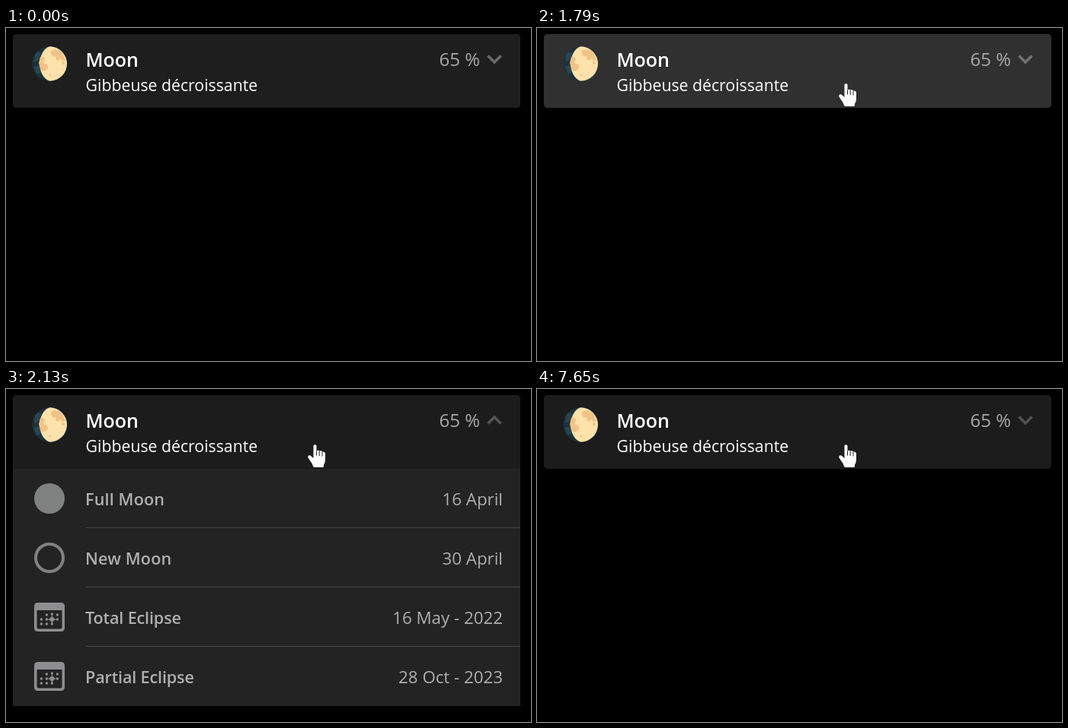
An HTML page that plays this animation: 689x438 px, repeating every 8000 ms.

```html
<!DOCTYPE html>
<html lang="en">
<head>
<meta charset="utf-8">
<title>Moon card</title>
<style>
html, body { margin: 0; width: 100%; height: 100%; overflow: hidden; background: #000; }
svg { display: block; width: 689px; height: 438px; }
text { font-family: "Open Sans", "Noto Sans", sans-serif; white-space: pre; }
.title { font-size: 25px; font-weight: 600; fill: #fff; }
.phase { font-size: 21.25px; fill: #fff; }
.percent { font-size: 24px; fill: #a9a9ab; text-anchor: end; }
.label { font-size: 21.6px; font-weight: 600; fill: #afafaf; }
.date { font-size: 22.3px; fill: #afafaf; text-anchor: end; }
.rule { stroke: #464646; }
#chevron { fill: none; stroke-width: 3.7; }
</style>
</head>
<body>
<svg viewBox="0 0 689 438">
  <defs>
    <clipPath id="reveal"><rect id="window" x="9" y="105" width="666" height="0"/></clipPath>
    <clipPath id="disc"><circle cx="57.2" cy="47" r="22.8"/></clipPath>
    <g id="calendar" fill="#8e8e91">
      <path fill-rule="evenodd" d="M42-20H72Q77-20 77-15V13Q77 18 72 18H42Q37 18 37 13V-15Q37-20 42-20ZM40.5-10V12.5Q40.5 14.5 42.5 14.5H71.500Q73.500 14.5 73.500 12.5V-10Z"/>
      <g id="dots"></g>
      <circle cx="60.4" cy="2" r="3.1"/>
      <path d="M60.400-3V7M55.400 2H65.400" stroke="#8e8e91" stroke-width="1.3"/>
    </g>
  </defs>

  <g id="rows" clip-path="url(#reveal)">
    <rect x="9" y="105" width="666" height="312" fill="#232323"/>
  </g>

  <path id="header"/>
  <g clip-path="url(#disc)">
    <rect x="34" y="24" width="47" height="46" fill="#1d303b"/>
    <path d="M38 33q5-3 8 0l-3 9-6 3zM36 51l7-2 4 9-6 3z" fill="#294552"/>
    <path d="M57.500 24C40 30 40 64 57.500 70H82V24Z" fill="#fee2ac"/>
    <g fill="#f1c386">
      <path d="M59 30q4-3 8-1 5 0 8 6l3 7-4 1-3-3-2 3-4-2 1-3-5-1-2-3z"/>
      <path d="M45 38q5-1 6 3l-2 5 5 2q3 4-1 7l-4 2-4-3-2-8z"/>
      <circle cx="75" cy="46" r="2"/>
      <circle cx="58" cy="62" r="1.500"/>
    </g>
  </g>
  <text class="title" x="104.500" y="51">Moon</text>
  <text class="phase" x="104.600" y="83">Gibbeuse décroissante</text>
  <text class="percent" x="622" y="50">65 %</text>
  <path id="chevron"/>

  <g id="cursor">
    <path id="arrow" d="M0 0V25L5.700 19.600 9.500 28.500 13.500 26.800 9.800 18.200H17.500Z" fill="#fff"/>
    <g id="hand">
      <path d="M-2 1.500Q0-1.500 2 1.500V8.500Q4.300 6.800 5.700 8.800 8.200 7.500 9.500 9.800 12.500 9 13.500 11.500V20Q13.500 24 11.500 26.500V28.500Q11.500 30 10 30H-.5Q-2 30-2.500 28.500-3.500 25-6 22L-9 17.500Q-9.800 13.500-6 14.500L-2 18Z" fill="#fff"/>
      <path d="M2 8.500V14.500M5.700 9V15M9.500 10V15.500" stroke="#1e1e1e"/>
    </g>
  </g>
</svg>
<script>
const $ = id => document.getElementById(id);
const LOOP = 8000;

// Calendar dots: three rows of a 7px grid, the middle one around the sun
const dots = [[53.4, -4], [60.4, -5], [67.4, -4], [46.4, 2], [53.4, 2], [67.4, 2], [46.4, 8], [53.4, 8], [60.4, 8]];
$('dots').innerHTML = dots.map(([x, y]) => `<circle cx="${x}" cy="${y}" r="1.7"/>`).join('');

const events = [
  ['Full Moon', '16 April', '<circle cx="57" cy="-1" r="20" fill="#808281"/>', 0.15],
  ['New Moon', '30 April', '<circle cx="57" cy="-1" r="18" fill="none" stroke="#808281" stroke-width="4"/>', 0.15],
  ['Total Eclipse', '16 May - 2022', '<use href="#calendar"/>', -0.15],
  ['Partial Eclipse', '28 Oct - 2023', '<use href="#calendar"/>', -0.15],
];
$('rows').innerHTML += events.map(([label, date, icon, gap], i) => `
  <g transform="translate(0 ${145 + 78 * i})">
    ${icon}
    <text class="label" x="104" y="8" letter-spacing="${gap}">${label}</text>
    <text class="date" x="652" y="8">${date}</text>
    ${i < 3 ? '<path class="rule" d="M105 37.5H675"/>' : ''}
  </g>`).join('');

// start ms, revealed height, header grey, chevron up, chevron colour
const states = [
  [0, 0, 30, false, '#6a6a6a'],
  [1790, 0, 48, false, '#727272'],
  [1860, 40, 44, true, '#6e6e6e'],
  [1920, 146, 39, true, '#6a6a6a'],
  [1990, 250, 35, true, '#646464'],
  [2060, 312, 31, true, '#5c5c5c'],
  [2130, 312, 28, true, '#555'],
  [7250, 312, 48, true, '#6e6e6e'],
  [7380, 250, 42, false, '#6c665f'],
  [7450, 132, 35, false, '#6a6057'],
  [7520, 40, 32, false, '#605a55'],
  [7580, 0, 30, false, '#585654'],
  [7650, 0, 28, false, '#525252'],
];

function drawCard(t) {
  const [, height, grey, up, colour] = states.findLast(s => s[0] <= t);
  const r = height ? 0 : 5;
  $('window').setAttribute('height', height);
  $('header').setAttribute('d',
    `M9 13Q9 8 14 8H670Q675 8 675 13V${105 - r}Q675 105 ${675 - r} 105H${9 + r}Q9 105 9 ${105 - r}Z`);
  $('header').setAttribute('fill', `rgb(${grey},${grey},${grey})`);
  $('chevron').setAttribute('d', up ? 'M632.5 45.5L641 37 649.5 45.5' : 'M632.5 36.5L641 45 649.5 36.5');
  $('chevron').setAttribute('stroke', colour);
}

// The pointer slows down in 14 even steps from the lower edge to the card
function drawCursor(t) {
  const step = Math.min(14, Math.floor((t - 500) / 67.1));
  const left = 1 - Math.max(0, step) / 14;
  const x = 405.5 + 132 * left ** 2.4;
  const y = 73 + 347 * left ** 1.7;
  const over = y < 105;
  $('cursor').style.display = step < 0 ? 'none' : '';
  $('cursor').setAttribute('transform', `translate(${x.toFixed(1)} ${y.toFixed(1)})`);
  $('hand').style.display = over ? '' : 'none';
  $('arrow').style.display = over ? 'none' : '';
}

const start = performance.now();
function frame() {
  const t = (performance.now() - start) % LOOP;
  drawCard(t);
  drawCursor(t);
  requestAnimationFrame(frame);
}
frame();
</script>
</body>
</html>
```
